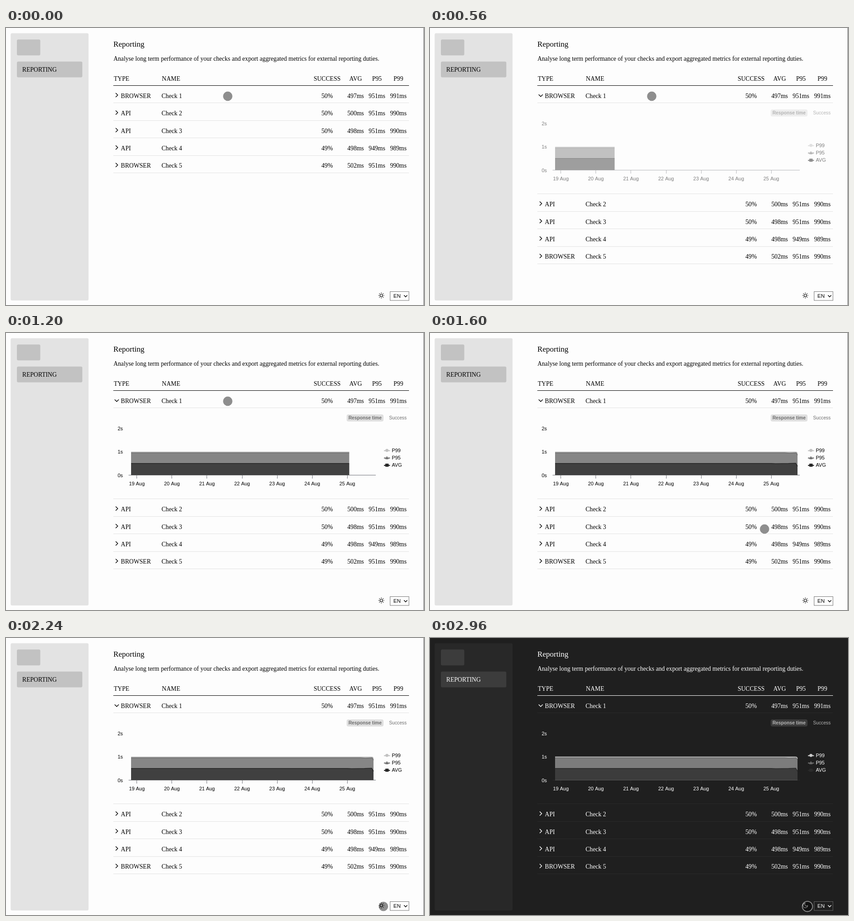
An HTML page with a canvas that plays this animation: 919 by 609 pixels, repeating every 4.4 s.

```html
<!DOCTYPE html>
<html lang="en">
<head>
<meta charset="utf-8">
<title>Reporting</title>
<style>
  html, body { margin: 0; width: 100%; height: 100%; overflow: hidden; background: #fdfdfd; }
  canvas { display: block; }
</style>
</head>
<body>
<canvas id="stage" width="919" height="609"></canvas>
<script>
const ctx = document.getElementById('stage').getContext('2d');
const LOOP = 4400, STEP = 80;
const OPEN = 320, DARK = 2800;
const SERIF = '"Liberation Serif", serif', SANS = '"Liberation Sans", sans-serif';
const BODY = `13.65px ${SERIF}`, LABEL = `10.9px ${SANS}`;

const themes = {
  light: { bg: '#fdfdfd', text: '#000', side: '#e3e3e3', block: '#c2c2c2', rule: '#e3e3e3',
    edge: '#6a6a6a', axis: '#6e7079', pill: '#dfdfdf', muted: '#6e6e6e', border: '#767676',
    fills: ['#c8c8c8', '#868686', '#404040'], lines: ['#c2c2c2', '#707070', '#262626'] },
  dark: { bg: '#1f1f1f', text: '#fff', side: '#282828', block: '#3c3c3c', rule: '#292929',
    edge: '#1a1a1a', axis: '#2b2b2b', pill: '#3c3c3c', muted: '#b4b4b4', border: '#666',
    fills: ['#9a9a9a', '#7c7c7c', '#3c3c3c'], lines: ['#cacaca', '#6c6c6c', '#2b2b2b'] }
};

const rows = [
  ['BROWSER', '50%', '497ms', '951ms', '991ms'],
  ['API', '50%', '500ms', '951ms', '990ms'],
  ['API', '50%', '498ms', '951ms', '990ms'],
  ['API', '49%', '498ms', '949ms', '989ms'],
  ['BROWSER', '49%', '502ms', '951ms', '990ms']
];
const columns = [706, 768.7, 815.5, 862.6];

// time, x, y
const pointerPath = [
  [1200, 487.5, 150], [1280, 430, 158], [1360, 367, 158], [1440, 440, 118],
  [1520, 605, 230], [1600, 735.5, 431], [1680, 772, 495], [1760, 788, 528],
  [1920, 803, 559], [2000, 809, 567], [2240, 829.8, 590.2]
];

let c;
const clamp = v => Math.max(0, Math.min(1, v));

function text(s, x, y, font = BODY, align = 'left', color = c.text) {
  ctx.font = font;
  ctx.textAlign = align;
  ctx.fillStyle = color;
  ctx.fillText(s, x, y);
}

function rect(x, y, w, h, color, r = 0) {
  ctx.fillStyle = color;
  ctx.beginPath();
  ctx.roundRect(x, y, w, h, r);
  ctx.fill();
}

function trace(points) {
  ctx.beginPath();
  points.forEach(p => ctx.lineTo(...p));
}

function line(points, color, width) {
  trace(points);
  ctx.strokeStyle = color;
  ctx.lineWidth = width;
  ctx.stroke();
}

function area(points, color) {
  trace(points);
  ctx.fillStyle = color;
  ctx.fill();
}

function chevron(x, y, down, w = 4.5) {
  line(down ? [[x - w, y - w / 2], [x, y + w / 2], [x + w, y - w / 2]]
            : [[x - w / 2, y - w], [x + w / 2, y], [x - w / 2, y + w]], c.text, 1.4);
}

function drawFrame() {
  rect(0, 0, 919, 609, c.bg);
  rect(918, 0, 1, 609, c.edge);
  rect(10.3, 11.5, 171.2, 587.5, c.side, 3);
  rect(24, 25.2, 51.4, 35, c.block, 3);
  rect(24, 73.8, 143.8, 34.6, c.block, 3);
  text('REPORTING', 35.8, 95.6);
  text('Reporting', 236, 41.3, `17.07px ${SERIF}`);
  text('Analyse long term performance of your checks and export aggregated metrics for external reporting duties.', 236.2, 72.3);
  text('TYPE', 237, 116);
  text('NAME', 342.8, 116);
  ['SUCCESS', 'AVG', 'P95', 'P99'].forEach((s, i) => text(s, columns[i], 116, BODY, 'center'));
  rect(236, 126, 650, 1, c.text);
}

function drawRows(open) {
  rows.forEach(([type, ...values], i) => {
    const y = 149 + i * 38.45 + (open && i ? 200 : 0);
    const down = open && !i;
    chevron(243.4, y - (down ? 0.6 : 1.5), down);
    text(type, 252.6, y + 4.6);
    text('Check ' + (i + 1), 342, y + 4.6);
    values.forEach((v, k) => text(v, columns[k], y + 4.6, BODY, 'center'));
    rect(236, Math.round(y + 15.4), 650, 1, c.rule);
  });
  if (open) rect(236, 364, 650, 1, c.rule);
}

function drawSeries(progress) {
  const series = [
    [[275, 261.6], [803, 261.6], [806, 262], [808, 265]],
    [[275, 263.4], [780, 263.4], [790, 264], [805, 263.4], [808, 268.5]],
    [[275, 286.8], [750, 286.8], [760, 287.2], [788, 286.8], [804, 286.2], [808, 293]]
  ];
  ctx.save();
  ctx.beginPath();
  ctx.rect(274, 240, 1 + 534 * progress, 80);
  ctx.clip();
  series.forEach((s, i) => area([...s, [808, 312.5], [275, 312.5]], c.fills[i]));
  series.forEach((s, i) => line(s, c.lines[i], 1.6));
  ctx.restore();
}

function drawLegend() {
  ['P99', 'P95', 'AVG'].forEach((s, i) => {
    const y = 258 + i * 16.2, color = c.lines[i];
    rect(831, y - 0.4, 13.2, 2.2, color);
    if (i === 0) rect(834.1, y - 3.3, 6.8, 6.8, color, 3.4);
    if (i === 1) area([[837.5, y - 3.6], [841.3, y + 3.2], [833.7, y + 3.2]], color);
    if (i === 2) rect(833.8, y - 3.2, 7.6, 6.8, color, 1);
    text(s, 848.2, y + 4, LABEL);
  });
}

function drawChart(t) {
  const p = clamp((t - OPEN) / 980);
  rect(749, 179, 81, 15.4, c.pill, 4);
  text('Response time', 789.4, 190.4, `bold 10.26px ${SANS}`, 'center', c.muted);
  text('Success', 861.5, 190.4, `10.26px ${SANS}`, 'center', c.muted);
  for (let i = 0; i < 3; i++) text(i + 's', 257, 316.6 - i * 51.2, LABEL, 'right');
  rect(269.5, 312, 543.5, 1, c.axis);
  for (let i = 0; i < 7; i++) {
    const x = 287.7 + i * 77.1;
    rect(Math.floor(x), 312, 1, 8, c.axis);
    text(19 + i + ' Aug', x, 335.2, LABEL, 'center');
  }
  drawSeries(p);
  drawLegend();
  // fade in by lifting a veil
  ctx.globalAlpha = (1 - p) ** 2.5;
  rect(236, 166, 652, 197, c.bg);
  ctx.globalAlpha = 1;
}

function drawSun(x, y) {
  ctx.beginPath();
  ctx.arc(x, y, 3, 0, 7);
  ctx.strokeStyle = c.text;
  ctx.lineWidth = 1.2;
  ctx.stroke();
  for (let i = 0; i < 8; i++) {
    const dx = Math.cos(i * Math.PI / 4), dy = Math.sin(i * Math.PI / 4);
    line([[x + dx * 5, y + dy * 5], [x + dx * 6.5, y + dy * 6.5]], c.text, 1.2);
  }
}

function drawMoon(x, y) {
  ctx.save();
  ctx.translate(x - 7, y - 7);
  ctx.scale(0.58, 0.58);
  ctx.strokeStyle = c.text;
  ctx.lineWidth = 2;
  ctx.stroke(new Path2D('M21 12.8A9 9 0 1 1 11.2 3 7 7 0 0 0 21 12.8z'));
  ctx.restore();
}

function drawFooter(dark) {
  (dark ? drawMoon : drawSun)(825.2, 588);
  rect(844, 579, 42.4, 20.4, c.border);
  rect(845, 580, 40.4, 18.4, c.bg);
  text('EN', 851.8, 592.6, `11.4px ${SANS}`);
  chevron(878.6, 589.4, true, 3.6);
}

function flash(t, start, ...box) {
  if (t < start) return;
  ctx.globalAlpha = 0.4 * clamp(1 - (t - start) / 160);
  rect(...box, 'rgb(45,165,220)');
  ctx.globalAlpha = 1;
}

function pointerAt(t) {
  const i = pointerPath.findIndex(p => p[0] > t);
  if (i === 0) return pointerPath[0].slice(1);
  if (i < 0) return pointerPath.at(-1).slice(1);
  const [t0, x0, y0] = pointerPath[i - 1], [t1, x1, y1] = pointerPath[i];
  const k = (t - t0) / (t1 - t0);
  return [x0 + (x1 - x0) * k, y0 + (y1 - y0) * k];
}

function drawPointer(t) {
  const [x, y] = pointerAt(t);
  ctx.beginPath();
  ctx.arc(x, y, 10.4, 0, 7);
  ctx.fillStyle = 'rgba(0,0,0,.44)';
  ctx.fill();
  ctx.beginPath();
  ctx.arc(x, y, 11.3, 0, 7);
  ctx.strokeStyle = 'rgba(255,255,255,.48)';
  ctx.lineWidth = 1.8;
  ctx.stroke();
}

function draw(now) {
  const t = Math.floor(now % LOOP / STEP) * STEP;
  const open = t >= OPEN, dark = t >= DARK;
  c = dark ? themes.dark : themes.light;
  drawFrame();
  drawRows(open);
  if (open) drawChart(t);
  drawFooter(dark);
  flash(t, OPEN, 236, 127, 650, 38);
  flash(t, DARK, 813.5, 579.5, 23, 19.5);
  drawPointer(t);
}

const start = performance.now();
function tick() {
  draw(performance.now() - start);
  requestAnimationFrame(tick);
}
tick();
</script>
</body>
</html>
```
